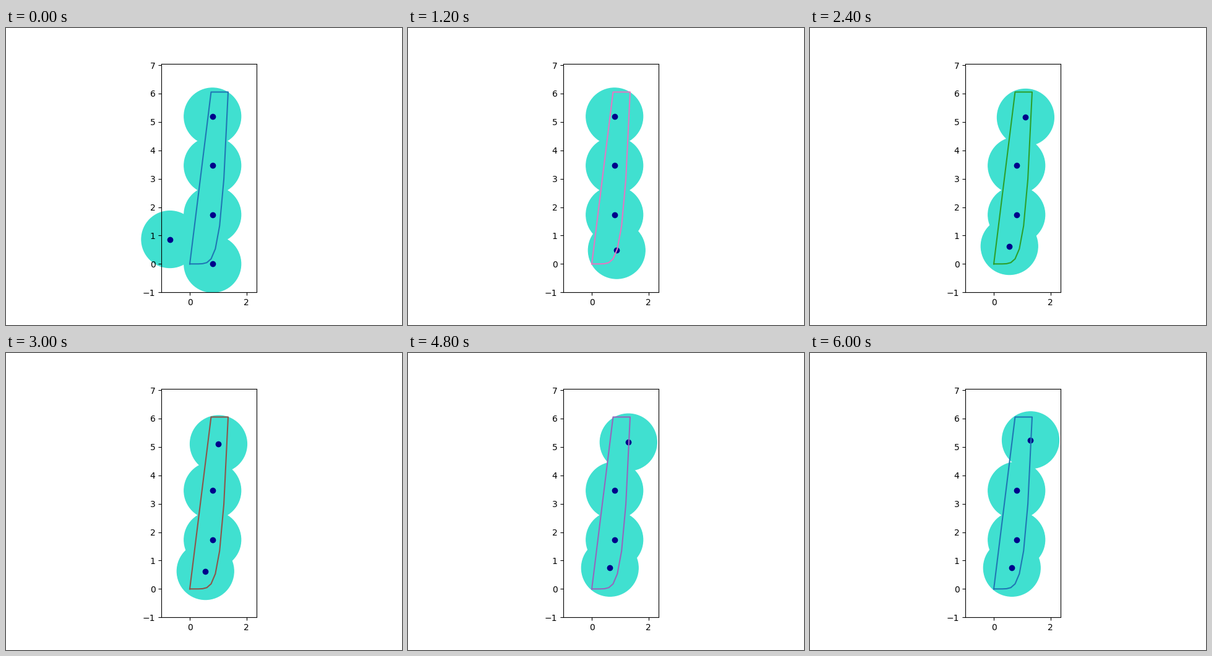
A matplotlib script for the animation above (6200 ms loop, 640 by 480 pixels).

```python
import numpy as np
import matplotlib.pyplot as plt
from matplotlib.animation import FuncAnimation

FRAMES, INTERVAL = 31, 200

# Hexagonal start layout: a column of four discs and one to the left
column = [(0.8, i * np.sqrt(3)) for i in range(4)]
side = (-0.7, np.sqrt(3) / 2)

# Spots the two end discs hop through
low_path = [column[0], (0.877, 0.482), (0.55, 0.625), (0.638, 0.74)]
high_path = [column[3], (1.12, 5.16), (1.012, 5.105),
             (0.855, 5.06), (1.291, 5.167), (1.296, 5.242)]


def spot(path, hop):
    return path[min(max(hop, 0), len(path) - 1)]


def centers(step):
    """The low disc hops at once, then every 8 steps; the high one every 5."""
    low = spot(low_path, (step > 0) + step // 8)
    high = spot(high_path, (step - 4) // 5)
    return [low, *column[1:3], high] + [side] * (step == 0)


# Region between y = x^6 and a straight edge
x = np.arange(10) * 0.15
y = x ** 6

fig, ax = plt.subplots(figsize=(6.4, 4.8), dpi=100)
ax.set_aspect("equal")
ax.set_xlim(-1, x[-1] + 1)
ax.set_ylim(-1, y[-1] + 1)

discs = [ax.add_patch(plt.Circle(c, 1, color="turquoise", clip_on=False))
         for c in centers(0)]
dots = ax.scatter(*zip(*centers(0)), color="darkblue", clip_on=False)
outline, = ax.plot([*x, 0.75, 0], [*y, y[-1], 0])


def update(step):
    pts = centers(step)
    for disc, c in zip(discs, pts):
        disc.center = c
    discs[-1].set_visible(len(pts) == len(discs))
    dots.set_offsets(pts)
    outline.set_color(f"C{step % 10}")
    return [*discs, dots, outline]


anim = FuncAnimation(fig, update, frames=FRAMES, interval=INTERVAL,
                     repeat=True, repeat_delay=0)
plt.show()
```
